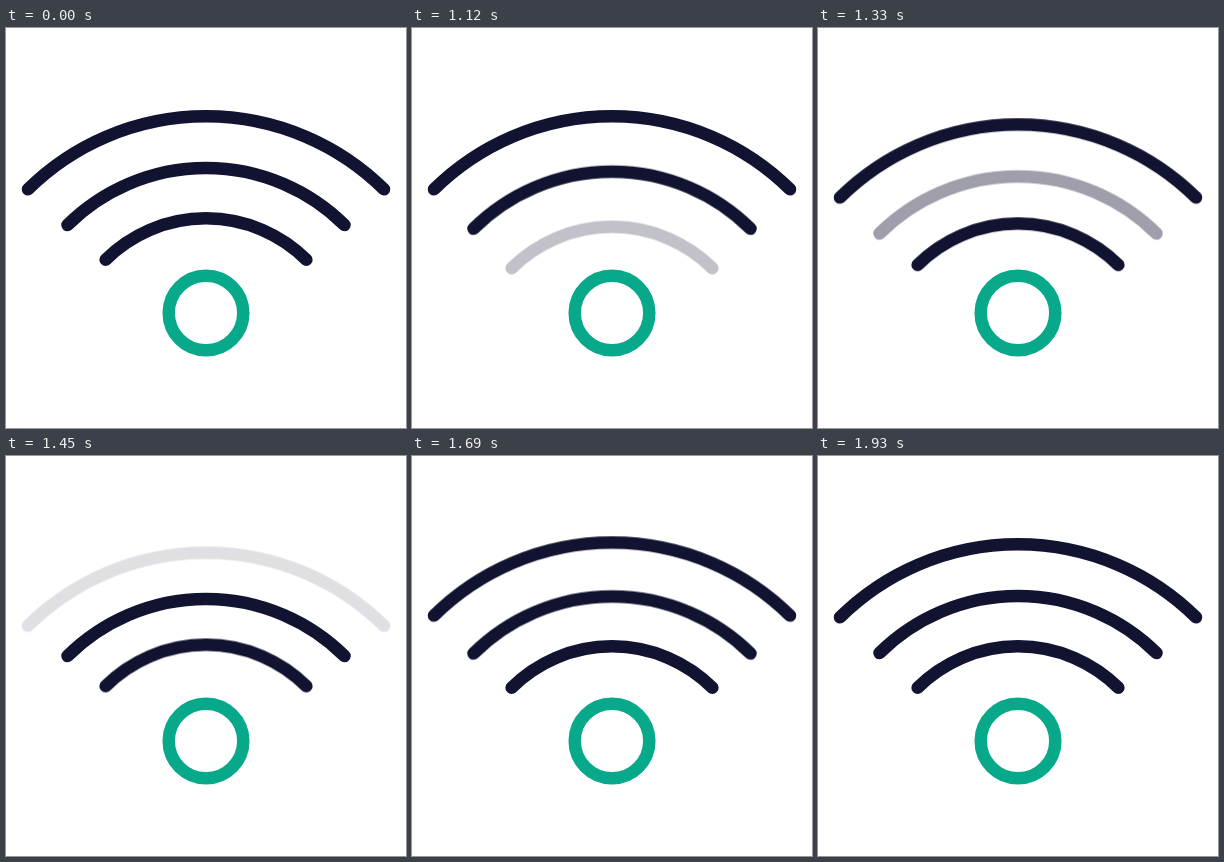
Write an HTML page that moves like this. It is 400x400 px and loops after 1990 ms.

```html
<!DOCTYPE html>
<html lang="en">
<head>
<meta charset="utf-8">
<title>Wireless signal</title>
<style>
  html, body { margin: 0; width: 100%; height: 100%; overflow: hidden; background: #fff; }
  svg { display: block; width: 100vw; height: 100vh; }
  .icon { fill: none; stroke-width: 12.5; stroke-linecap: round; }
  .wave {
    stroke: #121331;
    animation: bounce 1990ms linear infinite, blink 1990ms linear infinite;
    animation-delay: var(--lag);
  }
  .inner { --lag: 6ms; }
  .middle { --lag: 104ms; }
  .outer { --lag: 249ms; }
  .dot { stroke: #08a88a; }

  /* dip, wait while hidden, spring back past rest */
  @keyframes bounce {
    0%, 50.4% { transform: translateY(0); }
    51.4% { transform: translateY(5.2px); }
    54.3% { transform: translateY(8.2px); }
    55.3%, 64.8% { transform: translateY(8.5px); }
    66.6% { transform: translateY(5.2px); }
    67.6% { transform: translateY(3.3px); }
    69.3% { transform: translateY(-2.6px); }
    70.6% { transform: translateY(-4.2px); }
    72.5% { transform: translateY(-1.7px); }
    75.4% { transform: translateY(.5px); }
    79.9% { transform: translateY(.5px); }
    84.4%, 100% { transform: translateY(0); }
  }
  @keyframes blink {
    0%, 54.4% { opacity: 1; }
    56.6%, 59.8% { opacity: 0; }
    64.4%, 100% { opacity: 1; }
  }
</style>
</head>
<body>
<svg viewBox="0 0 400 400">
  <g class="icon">
    <path class="wave outer" d="M22 161.3A253.5 253.5 0 0 1 378 161.3"/>
    <path class="wave middle" d="M61.5 197A196.8 196.8 0 0 1 338.5 197"/>
    <path class="wave inner" d="M99.6 231.7A142.4 142.4 0 0 1 300.4 231.7"/>
    <circle class="dot" cx="200" cy="285" r="37.3"/>
  </g>
</svg>
</body>
</html>
```
